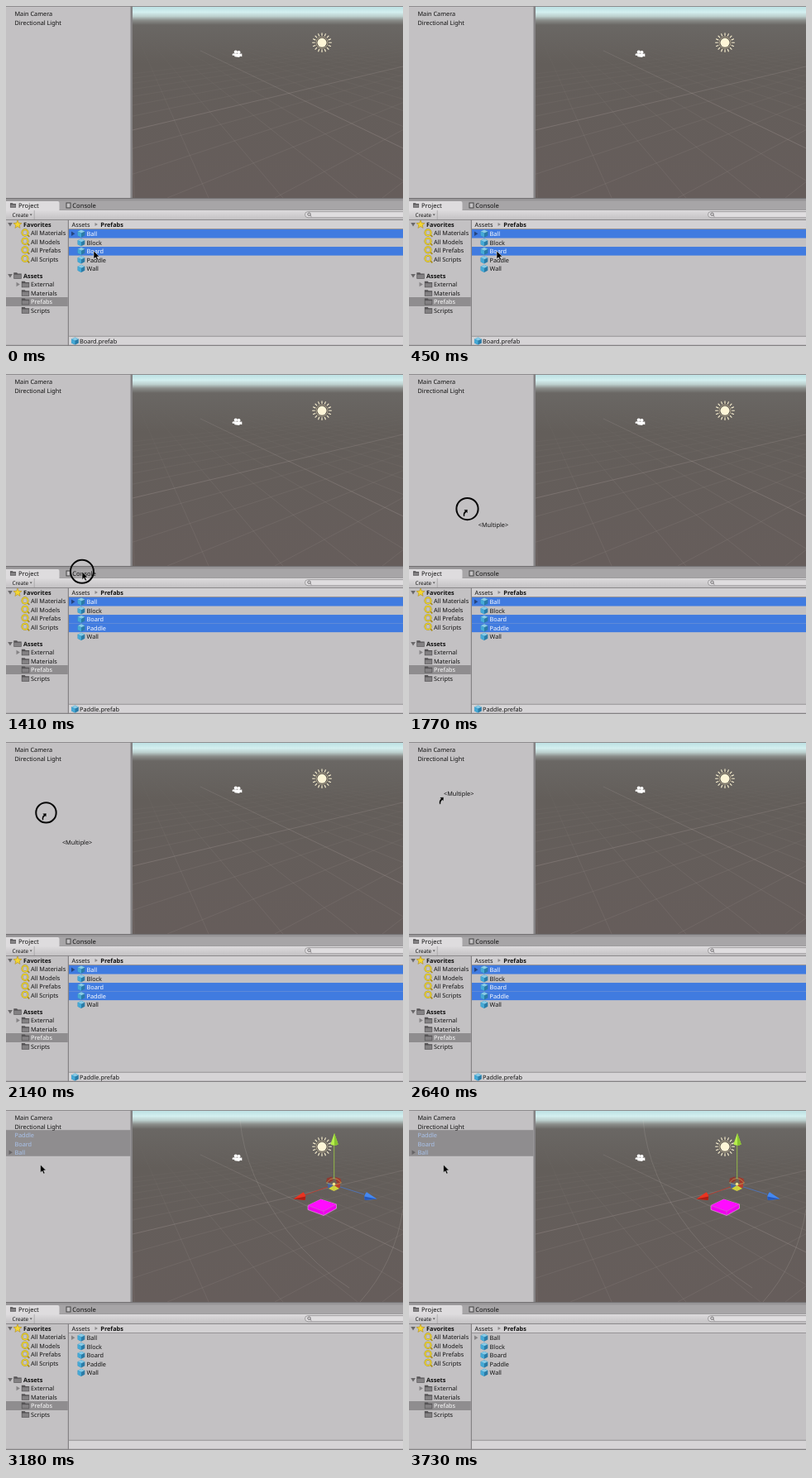
An HTML page for the animation above (3.78 s loop, 480 px wide and 411 px high).

```html
<!DOCTYPE html>
<html lang="en">
<head>
<meta charset="utf-8">
<title>Dragging prefabs into the hierarchy</title>
<style>
  html, body { margin: 0; width: 100%; height: 100%; overflow: hidden; background: #c3c1c3; }
  svg { display: block; width: 100vw; height: 100vh; }
  text { font: 7.3px "Noto Sans", "Open Sans", sans-serif; fill: #111; text-rendering: geometricPrecision; white-space: pre; }
  .b { font-weight: 700; }
  .w { fill: #fff; }
  .big { font-size: 7.6px; }
  .small { font-size: 6.4px; }
  .linked { fill: #a9c3ec; }
  .on text { fill: #fff; }
  .on .bar { visibility: visible; }
  .on .tri { fill: #24447f; }
  .bar { fill: #407be0; visibility: hidden; }
  .tri { fill: #858385; }
</style>
</head>
<body>
<svg id="stage" viewBox="0 0 480 411">
  <defs>
    <linearGradient id="sky" x1="0" x2="0" y1="1" y2="232" gradientUnits="userSpaceOnUse">
      <stop offset="0" stop-color="#bce0e3"/>
      <stop offset=".028" stop-color="#d3efef"/>
      <stop offset=".05" stop-color="#bccfcd"/>
      <stop offset=".07" stop-color="#8b8e8b"/>
      <stop offset=".095" stop-color="#6a6764"/>
      <stop offset=".3" stop-color="#635e5a"/>
      <stop offset="1" stop-color="#665d5b"/>
    </linearGradient>
    <linearGradient id="fade" x1="0" x2="0" y1="40" y2="150" gradientUnits="userSpaceOnUse">
      <stop offset="0" stop-color="#b5aaa6" stop-opacity="0"/>
      <stop offset="1" stop-color="#b5aaa6" stop-opacity=".15"/>
    </linearGradient>
    <linearGradient id="tool" x1="0" x2="0" y1="0" y2="1">
      <stop offset="0" stop-color="#dedcde"/>
      <stop offset="1" stop-color="#c4c2c4"/>
    </linearGradient>
    <clipPath id="view"><rect x="153" y="1" width="327" height="231"/></clipPath>
    <g id="cube">
      <path d="M0-4.6 4.3-2.6V2.4L0 4.6-4.3 2.4V-2.6Z" fill="#2b7ba6"/>
      <path d="M0-4.6 4.3-2.6 0-.6-4.3-2.6Z" fill="#8acbe6"/>
      <path d="M0-.6V4.6L-4.3 2.4V-2.6Z" fill="#45a9d6"/>
    </g>
    <g id="folder">
      <path d="M-4.7-3.8H-.8L.2-2.6H4.7V3.8H-4.7Z" fill="#555355"/>
      <path d="M-4-1.3H4V3.1H-4Z" fill="#838183"/>
    </g>
    <g id="find" fill="none">
      <path d="M1.900 1.700 4.800 4.500" stroke="#a98c1c" stroke-width="1.700"/>
      <circle cx="-.5" cy="-.6" r="3.600" stroke="#93812f" stroke-width="2"/>
      <circle cx="-.5" cy="-.6" r="3.600" stroke="#efd52a" stroke-width="1.300"/>
    </g>
    <path id="right" d="M-2-2.8 2.4 0-2 2.8Z"/>
    <path id="down" d="M-2.8-2H2.8L0 2.5Z"/>
  </defs>
  <g id="ui"></g>
  <g id="scene" clip-path="url(#view)"></g>
  <g id="made"></g>
  <text id="label">&lt;Multiple&gt;</text>
  <g id="mouse">
    <path id="arrow" d="M0 0V9.8L2.3 7.8 3.9 11.2 5.6 10.4 4 7.1H7Z" fill="#000" stroke="#ddd" stroke-width=".6"/>
    <path id="alias" d="M.6.6-4.7.9-3 2.5C-5.1 4.4-5.7 6.7-4.6 9.4L-2.7 9C-3.3 7-2.8 5.5-1.2 4.2L.3 5.7Z" fill="#000" stroke="#ddd" stroke-width=".6"/>
    <circle id="ring" fill="none" stroke="#080808" stroke-width="2"/>
  </g>
</svg>
<script>
const $ = id => document.getElementById(id);
const LOOP = 3780, ADD = 690, PRESS = 1010, LINK = 1530, RELEASE = 2400, DROP = 2770, SPAWN = 3010;

const rect = (x, y, w, h, fill, more = '') =>
  `<rect x="${x}" y="${y}" width="${w}" height="${h}" fill="${fill}" ${more}/>`;
const text = (x, mid, s, cls = '') => `<text x="${x}" y="${mid + 2.9}" class="${cls}">${s}</text>`;
const icon = (name, x, y, more = '') => `<use href="#${name}" x="${x}" y="${y}" ${more}/>`;
const shape = (d, fill, more = '') => `<path d="${d}" fill="${fill}" ${more}/>`;
const line = (d, c, w = 1) => `<path d="${d}" stroke="${c}" stroke-width="${w}" fill="none"/>`;
const disc = (x, y, r, fill, more = '') => `<circle cx="${x}" cy="${y}" r="${r}" fill="${fill}" ${more}/>`;

// Points spread evenly around a centre, starting at the top
const spread = (cx, cy, n, point) => Array.from({ length: n }, (_, i) => {
  const a = i * 2 * Math.PI / n - Math.PI / 2;
  return point(r => `${(cx + r * Math.cos(a)).toFixed(2)} ${(cy + r * Math.sin(a)).toFixed(2)}`, i);
}).join(' ');

function frame() {
  return rect(0, 0, 480, 411, '#c3c1c3') +
    rect(0, 0, 480, 1, '#8e8c8e') +
    rect(150.5, 0, 2.5, 233, '#858385') +
    rect(0, 232, 480, 4, '#979597') + rect(0, 232, 480, 1, '#737173') +
    rect(0, 235.5, 480, 11, '#a7a5a7') +
    shape('M0 236H62.500Q64.500 236 64.500 238V247H0Z', '#dedcde') +
    rect(0, 246.5, 480, 11.5, 'url(#tool)') +
    rect(64.5, 246, 415.5, .7, '#8d8b8d') +
    rect(0, 258, 480, 1, '#8b898b') +
    rect(33.8, 247, .7, 11, '#a09ea0') +
    rect(361.5, 248.6, 130, 7.2, '#dfdddf', 'rx="3.6" stroke="#858385" stroke-width=".7"') +
    disc(366.5, 251.7, 1.7, 'none', 'stroke="#5f5d5f" stroke-width=".9"') +
    line('M367.700 253 369.300 254.600', '#5f5d5f', .9) +
    rect(76, 259, 404, 10, '#d3d1d3') + rect(76, 269, 404, .8, '#8b898b') +
    rect(76, 399, 404, 11, '#d6d4d6') + rect(76, 398.8, 404, .8, '#858385') +
    rect(74.8, 258, 1.2, 152, '#858385') + rect(0, 409.7, 480, 1.3, '#858385');
}

function tabs() {
  return icon('folder', 0, 0, 'transform="translate(8.500 241) scale(.75)"') +
    text(15, 241.3, 'Project', 'big') +
    rect(73, 238, 5, 6, '#c4c2c4', 'stroke="#444" stroke-width="1"') +
    text(80.3, 241.3, 'Console', 'big') +
    text(7.5, 252.1, 'Create', 'small') +
    shape('M28.700 251.500H31.700L30.200 253.500Z', '#555');
}

function tree() {
  const saved = ['All Materials', 'All Models', 'All Prefabs', 'All Scripts'];
  const dirs = ['External', 'Materials', 'Prefabs', 'Scripts'];
  const star = spread(14, 264.2, 10, (at, i) => at(i % 2 ? 2.3 : 5.2));
  let out = rect(0, 352, 74.8, 11, '#8f8d8f');
  out += icon('down', 5, 264, 'fill="#6a686a"') + icon('down', 5, 326, 'fill="#6a686a"');
  out += `<polygon points="${star}" fill="#f4d631" stroke="#b18e1b" stroke-width=".6"/>`;
  out += text(21, 264, 'Favorites', 'b') + icon('folder', 14, 326) + text(21, 326, 'Assets', 'b');
  saved.forEach((s, i) => { const y = 274.5 + i * 10.45; out += icon('find', 23.5, y) + text(30, y, s); });
  dirs.forEach((s, i) => {
    const y = 336.5 + i * 10.45;
    out += icon('folder', 23.5, y) + text(30, y, s, i === 2 ? 'w' : '');
  });
  return out + icon('right', 14.5, 336.5, 'fill="#858385"');
}

function list() {
  const items = ['Ball', 'Block', 'Board', 'Paddle', 'Wall'];
  const rows = items.map((s, i) => {
    const y = 275.2 + i * 10.53;
    return `<g id="row${s}">` +
      `<rect class="bar" x="76" y="${y - 5.2}" width="404" height="10.55"/>` +
      (i ? '' : icon('right', 81, y, 'class="tri"')) +
      icon('cube', 91, y) + text(97.5, y, s) + '</g>';
  });
  return text(79.5, 264, 'Assets') + shape('M107.500 262 111 264 107.500 266Z', '#8b898b') +
    text(114.3, 264, 'Prefabs', 'b') + rows.join('') +
    `<g id="status">${icon('cube', 83.5, 405)}<text id="file" x="89" y="408"></text></g>`;
}

function world() {
  let out = rect(153, 1, 327, 231, 'url(#sky)');
  const fan = (vx, from, to, step) => {
    for (let x = from; x <= to; x += step) out += line(`M${vx} 12L${x} 232`, 'url(#fade)', .8);
  };
  fan(148, 155, 1500, 90);
  fan(739, -1105, 700, 130);
  out += '<g opacity=".15">' + line('M235 54 480 172M480 73 153 150', '#d0c6c0', .8) + '</g>';
  out += disc(382, 44.3, 8, '#5b554f');
  out += line(spread(382, 44.3, 16, at => `M${at(8.3)}L${at(11.8)}`), '#fbf2d2', 1.1);
  out += disc(382, 44.3, 7, 'none', 'stroke="#e9dfc0" stroke-width=".6"') + disc(382, 44.3, 5.5, '#fdf5d7');
  return out + disc(277.8, 55.6, 2.1, '#fff') + disc(281.5, 56, 2, '#fff') + disc(274.8, 58.7, 1.2, '#fff') +
    shape('M275 57.300 283 57.800 285.300 57.500V61.300L283 60.700 282 62 276.500 61.300Z', '#fff');
}

function spawned() {
  const cone = (d, dark, fill, shade) => shape(d, fill) + shape(dark, shade);
  return rect(0, 24.2, 150.5, 31.6, '#8f8d8f') +
    ['Paddle', 'Board', 'Ball'].map((s, i) => text(10.5, 30.2 + i * 10.45, s, 'linked')).join('') +
    icon('right', 5.5, 51.2, 'fill="#666466"') +
    '<g opacity=".16" clip-path="url(#view)">' +
    line('M283 12Q289 80 340 146 375 190 415 215M480 120Q470 185 428 232', '#e0d8d2', .9) + '</g>' +
    shape('M365 115.500 380.500 108 399.500 114V119L384 127.500 365 120.500Z', '#ef00ee', 'stroke="#e8b4e2" stroke-width=".6"') +
    shape('M365 115.500 380.500 108 399.500 114 384 122.500Z', '#ff0cff') +
    line('M365 115.500 384 122.500 399.500 114M384 122.500V127.500', '#c56cc0', .7) +
    line('M396.700 88V42', '#9fcf45', .8) + line('M394 91 361 103', '#c0392c', .8) + line('M398 91 433 102', '#4c78c8', .8) +
    disc(396.3, 90, 7, '#6f5f52') +
    shape('M388 82.500 394 80.500 395.500 85 391 88 387 87Z', '#8f3a30') +
    shape('M398 81 404.500 83 405.500 88 400 88Z', '#a03b2e') +
    shape('M397 90 404 87.500V93.500L398 96Z', '#b5402f') +
    shape('M396 90 389 87.500V93.500L395 96Z', '#46639f') +
    shape('M396.500 91 403 95 396.500 98 390 95Z', '#cfd43a') +
    line('M387.500 88Q396 77 405.500 88M387.500 88 396.500 91 405.500 88M396.500 91V98', '#c9b25c', .6) +
    disc(396.5, 89.5, 1.8, '#f0e58c') +
    cone('M397 28 401.700 41.500Q397 44 392.300 41.500Z', 'M397 28 401.700 41.500Q399 43 397 42.700Z', '#b6ee4b', '#87c431') +
    cone('M347.500 107.500 359.500 99.200Q363.500 103 361.500 109Z', 'M347.500 107.500 362.300 104.500 361.500 109Z', '#ea3421', '#a91f16') +
    cone('M448.500 107.500 436 99.200Q432 103 434 109Z', 'M448.500 107.500 433 104.500 434 109Z', '#4488f2', '#2758b8');
}

$('ui').innerHTML = frame() + tabs() + tree() + list();
$('scene').innerHTML = world();
$('made').innerHTML = spawned();
$('made').insertAdjacentHTML('afterend', text(10.5, 9.3, 'Main Camera') + text(10.5, 19.8, 'Directional Light'));

// Steps: time, x, y
const hot = [[0, 106, 296], [520, 106, 296], [740, 108, 302], [1110, 108, 302], [1410, 92, 239],
  [2140, 48.5, 85.5], [2330, 41.5, 66], [LOOP, 41.5, 66]];
const tag = [[LINK, 94, 225], [2140, 68, 123.7], [2500, 42, 64.5], [LOOP, 42, 64.5]];
const size = [[PRESS, 14, 0], [1410, 14, 0], [2140, 12.2, 0], [LOOP, 12.2, 0]];

function at(steps, t) {
  const i = Math.max(1, steps.findIndex(s => s[0] > t));
  const [a, b] = [steps[i - 1], steps[i]];
  const k = Math.max(0, Math.min(1, (t - a[0]) / (b[0] - a[0])));
  return [a[1] + (b[1] - a[1]) * k, a[2] + (b[2] - a[2]) * k];
}

const show = (id, on) => $(id).setAttribute('visibility', on ? 'visible' : 'hidden');
const pick = (name, on) => $('row' + name).classList.toggle('on', on);
const move = (id, [x, y]) => $(id).setAttribute('transform', `translate(${x} ${y})`);

function draw(t) {
  const held = t < DROP;
  pick('Ball', held);
  pick('Board', held);
  pick('Paddle', held && t >= ADD);
  show('status', held);
  $('file').textContent = t < ADD ? 'Board.prefab' : 'Paddle.prefab';
  show('made', t >= SPAWN);
  const linking = t >= LINK && t < SPAWN;
  show('alias', linking);
  show('arrow', !linking);
  show('ring', t >= PRESS && t < RELEASE);
  $('ring').setAttribute('r', at(size, t)[0]);
  move('mouse', at(hot, t));
  show('label', t >= LINK && held);
  move('label', at(tag, t));
}

const start = performance.now();
function tick() {
  draw((performance.now() - start) % LOOP);
  requestAnimationFrame(tick);
}
draw(0);
requestAnimationFrame(tick);
</script>
</body>
</html>
```
